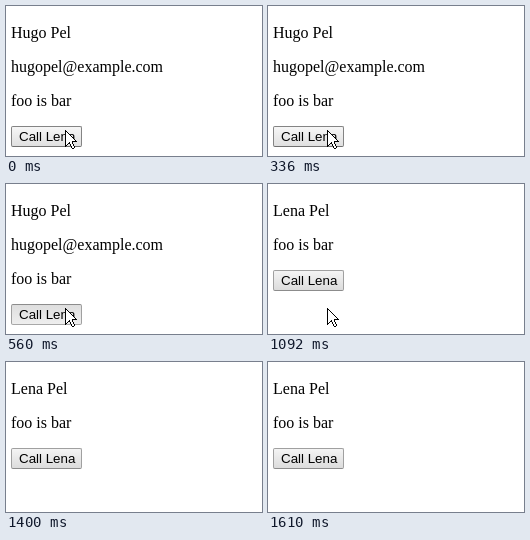
An HTML page for the animation above (1750 ms loop, 256x150 px).

```html
<!DOCTYPE html>
<html lang="en">
<head>
<meta charset="utf-8">
<title>Call button</title>
<style>
  html, body { margin: 0; width: 100%; height: 100%; overflow: hidden; background: #fff; }
  main { position: absolute; left: 5px; top: 18px; color: #000; white-space: nowrap;
    font: 16px/18px "Liberation Serif", "Times New Roman", serif; }
  p { margin: 0 0 16px; }
  .button { box-sizing: border-box; width: 71px; height: 21px; padding-left: 7px;
    font: 13.333px/19px "Liberation Sans", Arial, sans-serif;
    border: 1px solid #a0a0a0; border-bottom-color: #8c8c8c; border-radius: 2px;
    background: linear-gradient(#f4f4f4, #dcdcdc); }
  .button.hover { border-color: #848484 #848484 #707070; background: linear-gradient(#f6f6f6, #e0e0e0); }
  .button.pressed { border-color: #8c8c8c #a0a0a0 #a8a8a8; background: linear-gradient(#dedede, #eee); }
  svg { position: absolute; left: 59px; top: 124px; }
  [hidden] { display: none; }
</style>
</head>
<body>
<main>
  <p id="name"></p>
  <p id="email">hugopel@example.com</p>
  <p>foo is bar</p>
  <div id="button" class="button">Call Lena</div>
</main>
<svg id="cursor" width="12" height="19" shape-rendering="crispEdges">
  <path d="M.5 .5V16.5L4.5 12.5 6.5 17.5 7.5 18.5H8.5L9.5 17.5 7.5 12.5V11.5H11.5Z"
    fill="#fff" stroke="#000" stroke-linejoin="round"/>
</svg>
<script>
  const LOOP = 1750, PRESS = 560, RELEASE = 630, LEAVE = 1400;
  const byId = id => document.getElementById(id);
  const name = byId('name'), email = byId('email');
  const button = byId('button'), cursor = byId('cursor');

  function draw() {
    const time = performance.now() % LOOP;
    const called = time >= RELEASE;
    name.textContent = called ? 'Lena Pel' : 'Hugo Pel';
    email.hidden = called;
    button.className = 'button ' + (called ? '' : time >= PRESS ? 'pressed' : 'hover');
    cursor.style.display = time < LEAVE ? '' : 'none';
    requestAnimationFrame(draw);
  }
  draw();
</script>
</body>
</html>
```
